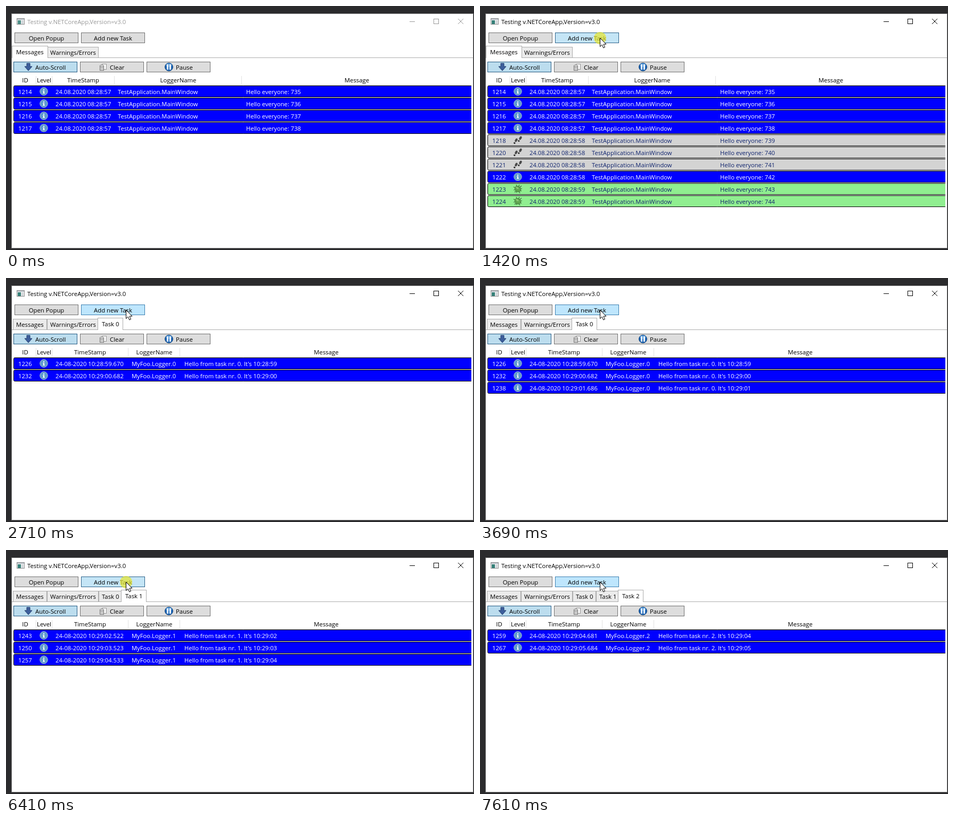
An HTML page with a canvas for the animation above (8 s loop, 879 px wide and 460 px high).

```html
<!DOCTYPE html>
<html lang="en">
<head>
<meta charset="utf-8">
<title>Log viewer</title>
<style>
  html, body { margin: 0; width: 100%; height: 100%; overflow: hidden; background: #2b2b2d; }
  canvas { display: block; }
</style>
</head>
<body>
<canvas id="stage" width="879" height="460"></canvas>
<script>
const ctx = document.getElementById('stage').getContext('2d');
const LOOP = 8000;
const FAMILY = '"Open Sans", "Noto Sans", sans-serif';
const UI_FONT = `11.35px ${FAMILY}`;
const ROW_FONT = `500 11.2px ${FAMILY}`;
const LEVELS = {
  info: { fill: '#0000ff', text: '#ffffff', icon: infoIcon },
  trace: { fill: '#d3d3d3', text: '#10246e', icon: stepsIcon },
  debug: { fill: '#90ee90', text: '#10246e', icon: bugIcon }
};

// Messages tab: [appears at, id, level, second]
const messages = [
  [0, 1214, 'info', 57], [0, 1215, 'info', 57], [0, 1216, 'info', 57], [0, 1217, 'info', 57],
  [100, 1218, 'trace', 58], [410, 1220, 'trace', 58], [630, 1221, 'trace', 58],
  [860, 1222, 'info', 58], [1080, 1223, 'debug', 59], [1290, 1224, 'debug', 59]
].map(([at, id, level, sec], i) => ({
  at, id, level, time: `24.08.2020 08:28:${sec}`,
  logger: 'TestApplication.MainWindow', text: `Hello everyone: ${735 + i}`
}));

// Task tabs: opening time and [appears at, id, clock]
const tasks = [
  { open: 1630, log: [[1630, 1226, '28:59.670'], [2710, 1232, '29:00.682'], [3690, 1238, '29:01.686']] },
  { open: 4460, log: [[4460, 1243, '29:02.522'], [5430, 1250, '29:03.523'], [6410, 1257, '29:04.533']] },
  { open: 6530, log: [[6530, 1259, '29:04.681'], [7610, 1267, '29:05.684']] }
].map(({ open, log }, n) => ({
  open,
  rows: log.map(([at, id, clock]) => ({
    at, id, level: 'info', time: `24-08-2020 10:${clock}`, logger: `MyFoo.Logger.${n}`,
    text: `Hello from task nr. ${n}. It's 10:${clock.slice(0, 5)}`
  }))
}));

// [press, release, glow ends]
const clicks = [[1290, 1520, 1730], [4240, 4460, 4570], [6410, 6530, 6630]];

// Pointer steps: [time, x, y]
const pointerPath = [
  [410, 352, 446], [520, 318, 290], [630, 291, 161], [750, 267, 117],
  [860, 249, 90], [970, 237, 74], [1080, 229, 64], [1190, 225, 60]
];

function rect(x, y, w, h, fill, stroke) {
  ctx.fillStyle = fill;
  ctx.fillRect(x, y, w, h);
  if (stroke) {
    ctx.strokeStyle = stroke;
    ctx.lineWidth = 1;
    ctx.strokeRect(x + .5, y + .5, w - 1, h - 1);
  }
}

function label(text, x, y, color = '#000', align = 'left') {
  ctx.fillStyle = color;
  ctx.textAlign = align;
  ctx.fillText(text, x, y);
}

function shape(points, fill, stroke) {
  ctx.beginPath();
  points.forEach(([x, y]) => ctx.lineTo(x, y));
  ctx.closePath();
  ctx.fillStyle = fill;
  ctx.fill();
  ctx.strokeStyle = stroke;
  ctx.lineWidth = 1;
  ctx.stroke();
}

function lines(color, width, ...segments) {
  ctx.strokeStyle = color;
  ctx.lineWidth = width;
  ctx.beginPath();
  for (const [x1, y1, x2, y2] of segments) { ctx.moveTo(x1, y1); ctx.lineTo(x2, y2); }
  ctx.stroke();
}

function oval(x, y, rx, ry, fill, angle = 0, stroke) {
  ctx.beginPath();
  ctx.ellipse(x, y, rx, ry, angle, 0, 7);
  ctx.fillStyle = fill;
  ctx.fill();
  if (stroke) { ctx.strokeStyle = stroke; ctx.lineWidth = 1; ctx.stroke(); }
}

function infoIcon(x, y) {
  oval(x, y, 7.3, 7.3, '#5f9bd0', 0, '#9fb4c8');
  rect(x - 1, y - 4, 2, 2, '#fff');
  rect(x - 1, y - 1, 2, 5, '#fff');
  rect(x - 2, y - 1, 1, 1, '#fff');
  rect(x - 2, y + 3, 4, 1, '#fff');
}

function stepsIcon(x, y) {
  for (const [dx, dy] of [[-4, 2], [4, -2]]) {
    oval(x + dx + 1, y + dy - 2, 2.2, 3.6, '#4a4a4a', .5);
    oval(x + dx - 2.2, y + dy + 3.4, 1.8, 1.5, '#333', .5);
  }
}

function bugIcon(x, y) {
  lines('#40703f', 1.2, [x - 8, y - 4, x + 7, y + 4], [x - 8, y + 2, x + 8, y - 1],
    [x - 3, y - 8, x + 4, y + 8], [x + 3, y - 8, x - 3, y + 7], [x - 6, y + 6, x + 7, y - 6]);
  oval(x, y, 6, 5, '#5fa650', .6, '#3f7a3a');
  oval(x - 1, y - 2, 3, 1.5, '#8cc878', .6);
}

function button(x, y, text, fill = '#dddddd', border = '#707070', textX) {
  rect(x, y, 120, 20, fill, border);
  if (textX) label(text, textX, y + 15);
  else label(text, x + 60, y + 15, '#000', 'center');
}

function drawWindow(active) {
  const ink = active ? '#000' : '#999';
  rect(0, 0, 879, 460, '#2b2b2d');
  rect(10, 14, 868, 443, '#fff', active ? '#707070' : '#858585');
  rect(20, 23, 15, 12, '#f4f4f4', '#8c8c8c');
  rect(21, 24, 13, 2, '#b5bcc4');
  rect(22, 27, 6, 7, active ? '#357f78' : '#4c8f88');
  rect(29, 27, 4, 7, '#d4d8dc');
  label('Testing v.NETCoreApp,Version=v3.0', 40, 34, ink);
  lines(ink, 1, [758, 29.5, 768, 29.5], [849, 24, 859, 34], [859, 24, 849, 34]);
  ctx.strokeRect(803.5, 24.5, 9, 9);
}

function drawToolbar(hover, pressed) {
  button(16, 50, 'Open Popup');
  if (pressed) button(141, 50, 'Add new Task', '#c4e5f6', '#2c628b');
  else if (hover) button(141, 50, 'Add new Task', '#bee6fd', '#3c7fb1');
  else button(141, 50, 'Add new Task');

  button(14, 105, 'Auto-Scroll', '#bcddee', '#245a83', 55);
  shape([[39, 108], [45, 108], [45, 114], [49, 114], [42, 122], [35, 114], [39, 114]], '#3d5f9c', '#243f70');
  button(139, 105, 'Clear', '#dddddd', '#707070', 195);
  rect(180, 109, 9, 11, '#f5f5f5', '#999');
  rect(176, 113, 8, 9, '#c9c9c9', '#777');
  oval(180, 113, 4, 1.6, '#eee', 0, '#777');
  button(264, 105, 'Pause', '#dddddd', '#707070', 319);
  oval(306, 115, 7.5, 7.5, '#1c66b8', 0, '#174578');
  oval(306, 111.5, 5.5, 3.4, '#4d93d6');
  rect(302, 110, 3, 10, '#fff');
  rect(307, 110, 3, 10, '#fff');
}

function drawTabs(taskCount) {
  const tabs = [['Messages', 13, 77], ['Warnings/Errors', 77, 174]];
  for (let n = 0; n < taskCount; n++) {
    const x = Math.round(174 + 43.6 * n);
    tabs.push([`Task ${n}`, x, x + 44]);
  }
  const selected = taskCount ? tabs.length - 1 : 0;
  tabs.forEach(([name, left, right], i) => {
    if (i === selected) return;
    rect(left, 77, right - left, 21, '#ebebeb', '#acacac');
    label(name, left + 6, 92);
  });
  rect(11, 97, 866, 1, '#acacac');
  const [name, left, right] = tabs[selected];
  rect(left - 2, 75, right - left + 4, 23, '#fff', '#acacac');
  rect(left - 1, 97, right - left + 2, 1, '#fff');
  label(name, left + 6, 91);
}

function drawRow(row, index, columns, hovered) {
  const y = 150 + 23 * index;
  const { fill, text, icon } = LEVELS[row.level];
  ctx.beginPath();
  ctx.roundRect(14.5, y + .5, 880, 21, 2);
  ctx.fillStyle = fill;
  ctx.fill();
  if (hovered) rect(15, y + 1, 870, 10, '#7373ff');
  ctx.strokeStyle = hovered ? '#dcdcff' : '#000';
  ctx.lineWidth = 1;
  ctx.stroke();
  label(row.id, 23, y + 16, text);
  icon(71, y + 11);
  label(row.time, 93, y + 16, text);
  label(row.logger, columns.logger + 6, y + 16, text);
  label(row.text, columns.message + 8, y + 16, text);
}

function drawTable(rows, columns, hoverIndex) {
  const { logger, message, messageCenter } = columns;
  for (const x of [56, 86, logger - 1, message - 1]) rect(x, 132, 1, 17, '#e2e2e2');
  rect(14, 149, 860, 1, '#d5d5d5');
  [['ID', 36], ['Level', 71.5], ['TimeStamp', (86 + logger) / 2],
    ['LoggerName', (logger + message) / 2], ['Message', messageCenter]]
    .forEach(([name, x]) => label(name, x, 144, '#000', 'center'));
  ctx.save();
  ctx.beginPath();
  ctx.rect(14, 149, 860, 306);
  ctx.clip();
  ctx.font = ROW_FONT;
  rows.forEach((row, i) => drawRow(row, i, columns, i === hoverIndex));
  ctx.restore();
}

function drawPointer(x, y) {
  shape([[0, 0], [0, 16], [3.7, 12.6], [6.3, 18.5], [9, 17.3], [6.5, 11.6], [11.5, 11.6]]
    .map(([dx, dy]) => [x + dx + .5, y + dy + .5]), '#fff', '#000');
}

function draw(t) {
  const shown = rows => rows.filter(row => t >= row.at);
  const taskCount = tasks.filter(task => t >= task.open).length;
  const pressed = clicks.some(([down, up]) => t >= down && t < up);
  const glowing = clicks.some(([down, , end]) => t >= down && t < end);

  ctx.font = UI_FONT;
  drawWindow(t >= 1290);
  drawToolbar(t >= 1080, pressed);
  drawTabs(taskCount);
  if (taskCount) {
    const rows = shown(tasks[taskCount - 1].rows);
    drawTable(rows, { logger: 230, message: 327, messageCenter: rows.length > 1 ? 601.5 : 653.5 });
  } else {
    const hoverIndex = t >= 630 && t < 750 ? 1 : -1;
    drawTable(shown(messages), { logger: 204, message: 443, messageCenter: 659 }, hoverIndex);
  }
  if (glowing) oval(225.5, 60.5, 11.5, 11.5, 'rgba(228, 228, 50, .72)');
  const step = pointerPath.filter(([at]) => t >= at).pop();
  if (step) drawPointer(step[1], step[2]);
}

const start = performance.now();
function tick() {
  draw((performance.now() - start) % LOOP);
  requestAnimationFrame(tick);
}
tick();
</script>
</body>
</html>
```
